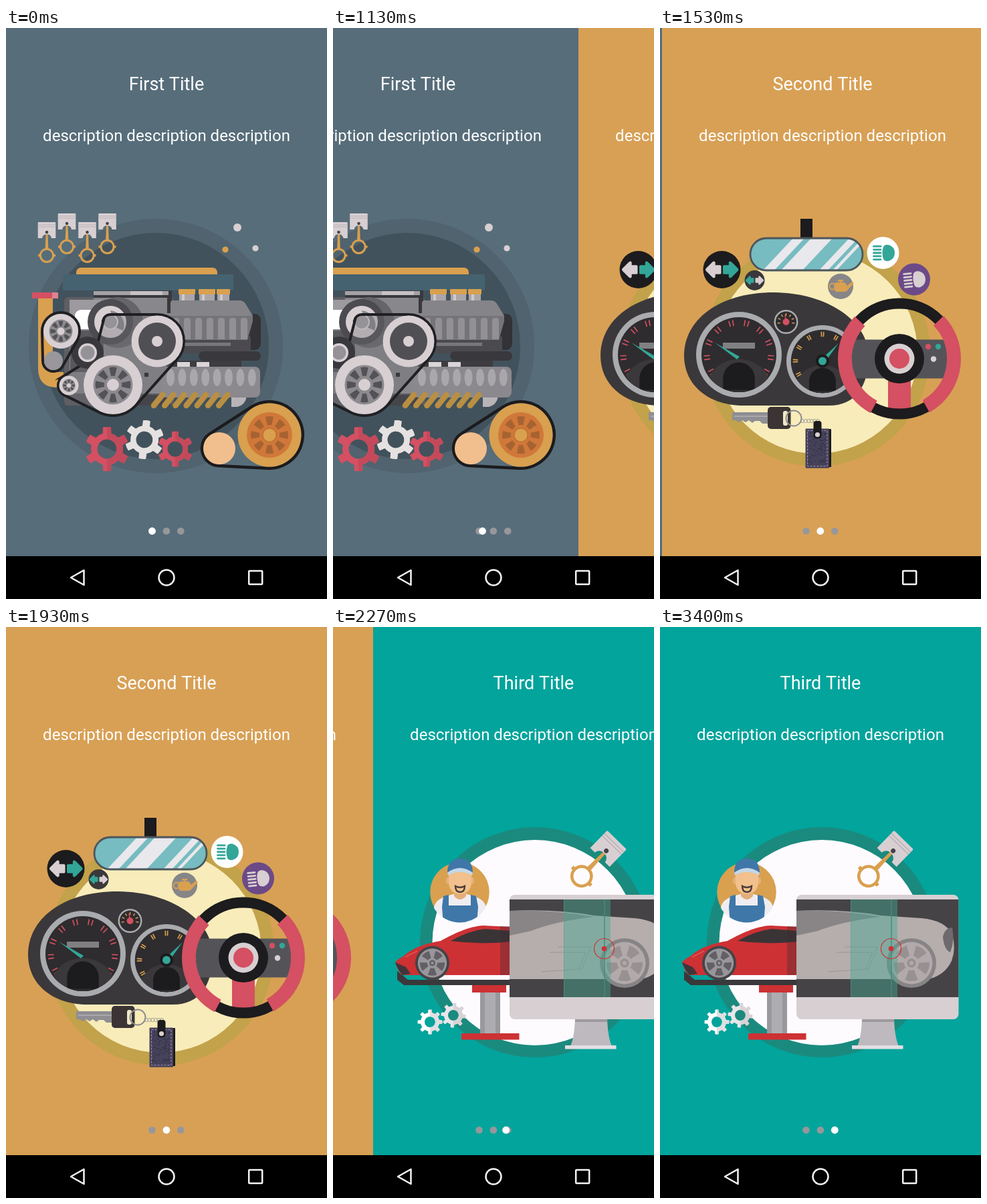
An HTML page with a canvas for the animation above (3.47 s loop, 480x853 px).

```html
<!DOCTYPE html>
<html lang="en">
<head>
<meta charset="utf-8">
<title>Onboarding pager</title>
<style>
html, body { margin: 0; width: 100%; height: 100%; overflow: hidden; background: #000; }
canvas { display: block; width: 100vw; height: 100vh; }
</style>
</head>
<body>
<canvas id="stage" width="480" height="853"></canvas>
<script>
const ctx = document.getElementById('stage').getContext('2d');
const W = 480, PAGE_H = 789, LOOP = 3470, TAU = Math.PI * 2;
const ORANGE = '#d9a04f', LIGHT = '#d8cfd2', RED = '#d45062', TEAL = '#33a698',
      INK = '#1c1b1d', COAL = '#3a383a', BLUE = '#3f77a8', CAR = '#cd3134';

// Drawing helpers
function paint(fill, stroke, width) {
  if (fill) { ctx.fillStyle = fill; ctx.fill(); }
  if (stroke) { ctx.strokeStyle = stroke; ctx.lineWidth = width; ctx.stroke(); }
}
function box(x, y, w, h, fill, r = 0, stroke, width) {
  ctx.beginPath();
  ctx.roundRect(x, y, w, h, r);
  paint(fill, stroke, width);
}
function disc(x, y, r, fill, stroke, width) {
  ctx.beginPath();
  ctx.arc(x, y, r, 0, TAU);
  paint(fill, stroke, width);
}
function oval(x, y, rx, ry, fill, rot = 0) {
  ctx.beginPath();
  ctx.ellipse(x, y, rx, ry, rot, 0, TAU);
  paint(fill);
}
function shape(d, fill, stroke, width) {
  const p = new Path2D(d);
  if (fill) { ctx.fillStyle = fill; ctx.fill(p); }
  if (stroke) { ctx.strokeStyle = stroke; ctx.lineWidth = width; ctx.stroke(p); }
}
function line(x1, y1, x2, y2, color, width, cap = 'butt') {
  ctx.lineCap = cap;
  ctx.beginPath();
  ctx.moveTo(x1, y1);
  ctx.lineTo(x2, y2);
  paint(null, color, width);
  ctx.lineCap = 'butt';
}
function arc(x, y, r, from, to, color, width) {
  ctx.beginPath();
  ctx.arc(x, y, r, from, to);
  paint(null, color, width);
}
function placed(x, y, rot, scale, draw) {
  ctx.save();
  ctx.translate(x, y);
  ctx.rotate(rot);
  ctx.scale(scale, scale);
  draw();
  ctx.restore();
}
function clipped(clip, draw) {
  ctx.save();
  ctx.beginPath();
  clip();
  ctx.clip();
  draw();
  ctx.restore();
}
// n evenly spaced ring segments; share is the covered part
function segments(x, y, r1, r2, n, share, color, rot = 0) {
  const step = TAU / n, half = step * share / 2;
  for (let i = 0; i < n; i++) {
    const a = rot + i * step;
    arc(x, y, (r1 + r2) / 2, a - half, a + half, color, r2 - r1);
  }
}
function ticks(x, y, r1, r2, from, to, n, color, width) {
  for (let i = 0; i < n; i++) {
    const a = from + (to - from) * i / (n - 1), c = Math.cos(a), s = Math.sin(a);
    line(x + r1 * c, y + r1 * s, x + r2 * c, y + r2 * s, color, width);
  }
}
function gear(x, y, R, r, hole, n, rot, left, right) {
  const step = TAU / n, w = 1.1 / n;
  const p = new Path2D();
  for (let i = 0; i < n; i++) {
    const a = rot + i * step, next = a + step;
    p.arc(x, y, R, a - w, a + w);
    p.arc(x, y, r, a + w * 1.45, next - w * 1.45);
  }
  p.closePath();
  p.moveTo(x + hole, y);
  p.arc(x, y, hole, 0, TAU);
  ctx.fillStyle = left;
  ctx.fill(p, 'evenodd');
  clipped(() => ctx.rect(x, y - R, R, R * 2), () => {
    ctx.fillStyle = right;
    ctx.fill(p, 'evenodd');
  });
}
// Belt around two circles
function belt(a, b, color, width) {
  const dx = b[0] - a[0], dy = b[1] - a[1];
  const dir = Math.atan2(dy, dx), k = Math.acos((a[2] - b[2]) / Math.hypot(dx, dy));
  ctx.beginPath();
  ctx.arc(...a, dir + k, dir - k);
  ctx.arc(...b, dir - k, dir + k);
  ctx.closePath();
  paint(null, color, width);
}
// Origin at the middle of the head's top edge
function piston(x, y, rot = 0, scale = 1) {
  placed(x, y, rot, scale, () => {
    shape('M-1.4 17H1.4L2.4 41H-2.4Z', ORANGE);
    disc(0, 49.8, 9.6, null, ORANGE, 3);
    box(-13, 48, 4, 3.5, ORANGE);
    box(9, 48, 4, 3.5, ORANGE);
    shape('M-13.3 1Q-13.3 0-12 0H12Q13.3 0 13.3 1V24H7Q6 18 0 18Q-6 18-7 24H-13.3Z', LIGHT);
    for (const h of [4, 7]) line(-13.3, h, 13.3, h, '#b3abb0', .8);
    disc(0, 15, 2.3, '#45444c');
  });
}

function engineBlock() {
  shape('M48 400H70V506Q70 514 78 514H86V537H76Q48 537 48 508Z', ORANGE);
  box(39, 395, 39, 9, RED);
  box(69, 395, 9, 9, '#de8291');
  box(105, 358, 211, 20, ORANGE, 7);
  box(85, 368, 255, 24, '#456270', 2);
  box(87, 402, 164, 162, '#5f5e63', 6);
  box(95, 406, 152, 140, '#88878b', 4);
  box(131, 392, 117, 34, '#39383c');
  box(131, 393, 112, 6, '#a3a2a6');
  box(186, 393, 48, 6, '#c6c1c5');
  box(131, 403, 110, 23, '#88878b');
  shape('M95 406H150L95 455Z', '#9c9a9e');
  box(103, 421, 30, 29, '#fff', [9, 0, 0, 9]);
  box(96, 452, 50, 62, '#59585d', 4);
}
function engineHeads() {
  box(336, 427, 45, 54, '#333236', 9);
  box(246, 460, 120, 26, '#4b4a4f', 3);
  box(246, 470, 90, 5, '#77767b');
  box(288, 483, 93, 14, '#39383c', 7);
  for (const [x, w] of [[259, 23], [289, 23], [316, 18]]) {
    box(x, 397, w, 11, '#aaa6aa');
    box(x + 4, 397, 4, 11, '#d0cacd');
    box(x - 1, 390, w + 2, 8, ORANGE, 1);
  }
  shape('M246 411Q246 407 251 407H348Q355 407 358 412L369 430V438L361 466H246Z', '#757479');
  shape('M246 411Q246 407 251 407H348Q355 407 358 412L369 430H246Z', '#858489');
  for (let i = 0; i < 7; i++) box(249 + i * 17, 433, 10, 32, '#929095', [4, 4, 0, 0]);
  box(240, 497, 112, 10, '#3d3c40');
  for (const x of [256, 285]) box(x, 499, 19, 7, '#d9d5d8');
  box(196, 548, 50, 16, '#46454a');
  shape('M337 550H360Q358 563 346 566H337Z', '#b9b4b8');
  box(232, 506, 148, 46, '#8b898e', 8);
  for (let i = 0; i < 8; i++) oval(246 + i * 17.4, 522, 6, 13, '#aaa7ac');
  for (let i = 0; i < 7; i++) {
    const x = 221 + i * 16.2;
    line(x, 564, x + 13, 548, '#b88f43', 8.5, 'round');
  }
}
function spokedWheel(x, y, r, hub) {
  disc(x, y, r, LIGHT);
  disc(x, y, r * .67, '#8c8a8e');
  segments(x, y, r * .3, r * .6, 8, .56, '#535257');
  disc(x, y, hub, LIGHT);
}
function pulleys() {
  disc(167, 440, 38, '#66656a');
  disc(156, 439, 34, '#4c4b50');
  disc(156, 439, 24, LIGHT);
  shape('M156 422A22 22 0 0 1 175 452L164 447Z', '#8a888d');
  disc(156, 439, 11, '#aaa7ab', '#e4dee1', 2);

  ctx.beginPath();
  ctx.moveTo(83, 522);
  ctx.lineTo(118, 500);
  ctx.quadraticCurveTo(132, 492, 136, 475);
  ctx.lineTo(146, 436);
  ctx.arc(156, 439, 11, 3.4, 4.7);
  ctx.arc(226, 468, 40, -1.57, .73);
  ctx.arc(160, 533, 46, .73, 2.02);
  ctx.arc(94, 534, 16, 2.02, 4);
  ctx.closePath();
  paint('rgba(110,109,114,.35)', '#202023', 4);
  box(207, 515, 6, 6, '#39383c');

  disc(122, 485, 24, '#39383c');
  disc(122, 485, 14, LIGHT);
  disc(122, 485, 10.5, '#949297');
  disc(226, 468, 38.5, LIGHT);
  disc(226, 468, 28, '#504f54');
  disc(226, 468, 8, LIGHT);
  spokedWheel(160, 533, 44, 9);
  spokedWheel(94, 534, 14.5, 3);
  belt([82, 453, 28], [71, 497, 16], '#202023', 4);
  spokedWheel(82, 453, 26, 5.5);
  disc(71, 497, 14, '#99979c');
}
function enginePage() {
  disc(224, 475, 190, '#50636e');
  disc(224, 475, 169, '#42525c');
  piston(61, 290);
  piston(91, 277);
  piston(121.5, 290);
  piston(151.5, 277);
  disc(346, 298, 6, LIGHT);
  disc(328, 331, 4.6, ORANGE);
  disc(373, 329, 4.6, LIGHT);
  engineBlock();
  engineHeads();
  pulleys();
  gear(151, 629, 33, 24, 14.5, 6, Math.PI / 6, RED, '#c44a5b');
  gear(253, 629, 26.5, 19, 11.5, 6, Math.PI / 6, RED, '#c44a5b');
  gear(207, 615, 29, 21, 12.5, 6, .64, '#e6e1e1', '#e6e1e1');
  belt([394, 608, 49.7], [319, 628, 26], INK, 4.5);
  disc(394, 608, 47.5, ORANGE);
  disc(319, 628, 24, '#f1bf8d');
  disc(394, 608, 34, '#d0783a');
  segments(394, 608, 15, 28, 8, .56, '#a66331');
  disc(394, 608, 11, '#c1702f');
  disc(394, 608, 9.5, ORANGE);
}

function arrow(x, y, dir, s, color) {
  placed(x, y, 0, s, () => {
    ctx.scale(dir, 1);
    shape('M0-5Q0-7 2-7H9V-11Q10-14 13-12L23-2Q25 0 23 2L13 12Q10 14 9 11V7H2Q0 7 0 5Z', color);
  });
}
function lamp(x, y, rot, color) {
  placed(x, y, rot, 1, () => {
    for (let i = -2; i <= 2; i++) line(-14.5, i * 4.9, -4, i * 4.9, color, 2.8, 'round');
    shape('M0-9Q2-13 8-12Q17-9 17 0Q17 9 8 12Q2 13 0 9Q-3 0 0-9Z', color);
  });
}
function gauge(x, y, r, from, n, color) {
  disc(x, y, r, '#a9abae');
  disc(x, y, r * .875, '#2e2c2e');
  ticks(x, y, r * .68, r * .82, from, Math.PI - from, n, color, 1.7);
  clipped(() => ctx.arc(x, y, r * .875, 0, TAU), () => {
    oval(x, y + r * .72, r * .72, r * .62, COAL);
    shape(`M${x - r * .37} ${y + r}V${y + r * .55}A${r * .37} ${r * .37} 0 0 1 ${x + r * .37} ${y + r * .55}V${y + r}Z`, INK);
    box(x - r, y + r * .82, r * 2, r, '#2e2c2e');
  });
}
function mirror() {
  box(207, 285, 18, 30, INK);
  box(132, 314, 168, 48, '#76bcc0', 24);
  clipped(() => ctx.roundRect(132, 314, 168, 48, 24), () => {
    for (const [x, w] of [[150, 17], [177, 32], [234, 13], [254, 6]]) {
      shape(`M${x} 363L${x + 47} 313h${w}L${x + w} 363Z`, '#e9e8ec');
    }
  });
  box(132, 314, 168, 48, null, 24, '#4d565c', 2.8);
}
function dashboard() {
  shape('M33 489C33 438 82 395 168 395C247 396 308 437 309 490C309 535 289 564 250 564H122C71 564 33 535 33 489Z', COAL);
  gauge(115, 488, 64, -3.65, 23, RED);
  box(91, 470, 48, 9, '#808083');
  shape('M79 470L116 491L112 495Z', TEAL);
  gauge(240, 498, 54, -3.6, 21, ORANGE);
  shape('M264 471L243 500L238 495Z', TEAL);
  disc(240, 497.5, 10, INK);
  disc(240, 497.5, 6, TEAL);
  disc(185.5, 439, 18, '#a9abae');
  disc(185.5, 439, 15.5, '#2e2c2e');
  ticks(185.5, 439, 9, 13, -3.3, .16, 7, ORANGE, 1.5);
  line(185.5, 439, 184, 428, RED, 1.5);
  disc(185.5, 439, 5, RED);
}
function steeringWheel() {
  const x = 355, y = 494;
  box(338, 520, 34, 49, RED);
  box(284, 465.5, 142, 58, '#545458');
  disc(x, y, 82.5, null, INK, 16);
  arc(x, y, 81.5, -.77, 1.06, RED, 21);
  arc(x, y, 81.5, 2.06, 3.9, RED, 21);
  disc(x, y, 37, INK);
  disc(x, y, 22.5, LIGHT);
  disc(x, y, 15, RED);
  disc(398, 476, 4.2, RED);
  disc(413, 476, 4.2, TEAL);
  disc(406, 494.5, 4.2, LIGHT);
}
function keys() {
  shape('M105 574H162V591H150L146 587H139L135 590L130 586L125 589L120 586L115 589L110 586H105Z', '#8e8e93');
  line(108, 580, 160, 580, '#a9a9ad', 2);
  box(158, 566, 34.5, 33, '#3a3435', 5);
  box(181, 572, 7, 22, '#f2e8c8', 3);
  for (let i = 0; i < 6; i++) disc(210 + i * 4.6, 587, 2.6, null, '#a3a09b', 1);
  disc(197, 583, 11.5, null, '#8d8c90', 2);
  box(219, 599, 34, 57, INK, 1);
  box(214.5, 598.5, 35.5, 59, '#45425a', 1);
  let seed = 7;
  const rand = () => (seed = seed * 16807 % 2147483647) / 2147483647;
  for (let i = 0; i < 110; i++) box(219 + rand() * 26, 604 + rand() * 47, 1.2, 1.2, '#2d2b3c');
  ctx.setLineDash([3, 2]);
  box(217.5, 601.5, 29.5, 53, null, 0, '#aa8eb4', 1);
  ctx.setLineDash([]);
  box(226.5, 587, 12, 26, INK, 4);
  disc(232.5, 607.5, 3.6, LIGHT);
}
function oilCan() {
  disc(267, 386, 19, '#868688');
  shape('M257 384Q258 380 263 380H273L277 385L284 379L287 381L277 392Q276 394 273 394H260Q257 390 257 384Z', ORANGE);
  box(263, 376, 8, 2.5, ORANGE);
  box(266, 377, 2, 4, ORANGE);
  disc(255, 386, 4.5, null, ORANGE, 1.8);
}
function cockpitPage() {
  disc(231, 485, 170, '#c2a24a');
  disc(231, 485, 151, '#f8ecba');
  mirror();
  disc(89.5, 361, 28, INK);
  arrow(88.5, 361, -1, .98, LIGHT);
  arrow(91, 361, 1, .98, TEAL);
  disc(138.5, 377, 15, COAL);
  arrow(137.5, 377, -1, .53, TEAL);
  arrow(139.5, 377, 1, .53, LIGHT);
  disc(330.5, 336, 24, '#fff');
  lamp(331, 336, 0, TEAL);
  disc(377, 375.5, 24, '#6c4a88');
  lamp(377, 376, -.1, LIGHT);
  oilCan();
  dashboard();
  keys();
  steeringWheel();
}

function mechanic() {
  disc(129.5, 396, 44.3, ORANGE);
  clipped(() => { ctx.rect(85, 340, 90, 56); ctx.arc(129.5, 396.5, 45, 0, Math.PI); }, () => {
    shape('M91 445V419Q93 407 110 402L120 399H140L150 402Q167 407 169 419V445Z', '#efedf1');
    shape('M121 392H139V402Q130 412 121 402Z', '#e3ae79');
    shape('M105 402L113 400V416H146V400L154 402L157 418L155 445H105L103 418Z', BLUE);
  });
  oval(112, 379, 3, 5, '#e5b17d');
  oval(148, 379, 3, 5, '#e5b17d');
  shape('M113 364H147V382Q146 398 130 399Q114 398 113 382Z', '#f1c08c');
  shape('M123 387Q123 396 130 396Q137 396 137 387Q130 391 123 387Z', null, '#4b3c39', 2.4);
  shape('M111 367Q111 346 130 346Q149 346 149 367Q130 356 111 367Z', BLUE);
  shape('M111 367Q130 353 149 367L148 371Q130 361 112 371Z', '#c4d7e8');
}
function lift() {
  shape('M36 514L52 527H204V535H46L36 527Z', COAL);
  box(148, 535, 51, 11, CAR);
  box(160, 546, 30, 62, '#99989c');
  box(167, 546, 16, 62, '#adacb0');
  box(132, 607, 86.5, 9.5, CAR);
}
function rim(x, y, r, tyre, metal, dark) {
  disc(x, y, r, tyre);
  disc(x, y, r * .85, metal);
  segments(x, y, r * .3, r * .73, 5, .58, dark, -Math.PI / 2 + TAU / 10);
  disc(x, y, r * .18, dark);
  disc(x, y, r * .08, metal);
}
function car() {
  shape('M33 501Q34 498 45 492C60 478 82 472 101 469C119 459 143 447 165 446L206 448V520H44Q38 517 33 501Z', CAR);
  shape('M116 469Q142 454 167 451L206 454V470Q160 475 116 469Z', '#3a3437');
  shape('M33 501L49 508L56 518L44 520Q37 512 33 501Z', '#41353a');
  line(48, 493, 66, 484, '#e4686a', 1.2);
  box(190, 447, 15, 73, 'rgba(60,45,50,.35)');
  rim(88.5, 502, 25.5, '#454347', '#98969a', '#626065');
}
function monitor() {
  shape('M302 585H350Q351 613 357 626H295Q301 613 302 585Z', '#bdb9be');
  box(302, 585, 48, 5, '#9d999e');
  box(287, 625, 76.5, 5.5, '#e3dfe3');
  box(204, 400, 242.5, 186, LIGHT, 8);
  box(204, 407, 242.5, 146, '#454346');
  shape('M204 424Q275 421 330 431L391 435Q426 438 437 459Q443 480 436 499Q426 520 402 526H204Z', '#b6adad');
  shape('M204 424Q271 422 330 433Q271 440 236 454L204 461Z', '#898587');
  shape('M437 449Q426 449 423 463Q425 482 434 486Q441 469 437 449Z', '#6e696c');
  shape('M251 515L312 511L326 478H276M264 486H318L308 510', null, '#918b8c', .7);
  rim(376, 502, 37, '#878485', '#b2a9aa', '#979192');
  box(285, 407, 70, 146, 'rgba(70,166,145,.46)');
  line(346, 407, 346, 553, '#438b7c', 1.4);
  line(285.5, 407, 285.5, 553, 'rgba(70,166,145,.5)', 1);
  disc(345.5, 480.5, 15, null, CAR, 1.2);
  disc(345.5, 480.5, 3.8, CAR);
}
function workshopPage() {
  disc(242, 471, 172, '#1b8a7e');
  disc(242, 471.5, 153.5, '#fefbff');
  piston(364.5, 318, .77, 1.52);
  mechanic();
  gear(85, 590, 18.5, 14, 8, 8, 0, '#fff', '#e2dee1');
  gear(120, 580, 18.5, 14, 8, 8, .1, '#e9e6e9', '#d8d3d6');
  lift();
  car();
  monitor();
}

const pages = [
  { bg: '#576d7a', title: 'First Title', art: enginePage },
  { bg: '#d8a055', title: 'Second Title', art: cockpitPage },
  { bg: '#02a49c', title: 'Third Title', art: workshopPage }
];

function drawPage(page, x) {
  clipped(() => ctx.rect(x, 0, W, PAGE_H), () => {
    ctx.translate(x, 0);
    box(0, 0, W, PAGE_H, page.bg);
    page.art();
    ctx.fillStyle = '#fff';
    ctx.textAlign = 'center';
    ctx.font = '27px Roboto, sans-serif';
    ctx.fillText(page.title, W / 2, 92.5);
    ctx.font = '24px Roboto, sans-serif';
    ctx.fillText('description description description', W / 2, 168.5);
  });
}
function drawChrome(offset) {
  for (let i = 0; i < 3; i++) disc(218.5 + i * 21.4, 751.5, 5.3, '#97979b');
  disc(218.5 + offset / W * 21.4, 751.5, 5.4, '#fff');
  box(0, PAGE_H, W, 64, '#000');
  ctx.lineJoin = 'round';
  shape('M97 821L116.5 810V832Z', null, '#f4f4f4', 2.5);
  ctx.lineJoin = 'miter';
  disc(240, 821, 11.5, null, '#f4f4f4', 2.5);
  box(363.2, 811, 20, 20, null, 1, '#f4f4f4', 2.5);
}

// A swipe: accelerating drag, then a 600 ms quintic settle
const DRAG = 226, SETTLE = 600;
function swipe(t, start, release) {
  if (t <= start) return 0;
  if (t < release) return DRAG * ((t - start) / (release - start)) ** 3;
  const left = Math.max(0, 1 - (t - release) / SETTLE);
  return W - (W - DRAG) * left ** 5;
}
function offsetAt(t) {
  return Math.round(swipe(t, 954, 1180) + swipe(t, 1926, 2116));
}

let shown = -1;
function frame(now) {
  // The screen updates 15 times a second
  const t = Math.floor((now % LOOP + 4) * .015) / .015;
  const offset = offsetAt(t);
  if (offset !== shown) {
    shown = offset;
    pages.forEach((page, i) => {
      const x = i * W - offset;
      if (x > -W && x < W) drawPage(page, x);
    });
    drawChrome(offset);
  }
  requestAnimationFrame(frame);
}
frame(performance.now());
</script>
</body>
</html>
```
